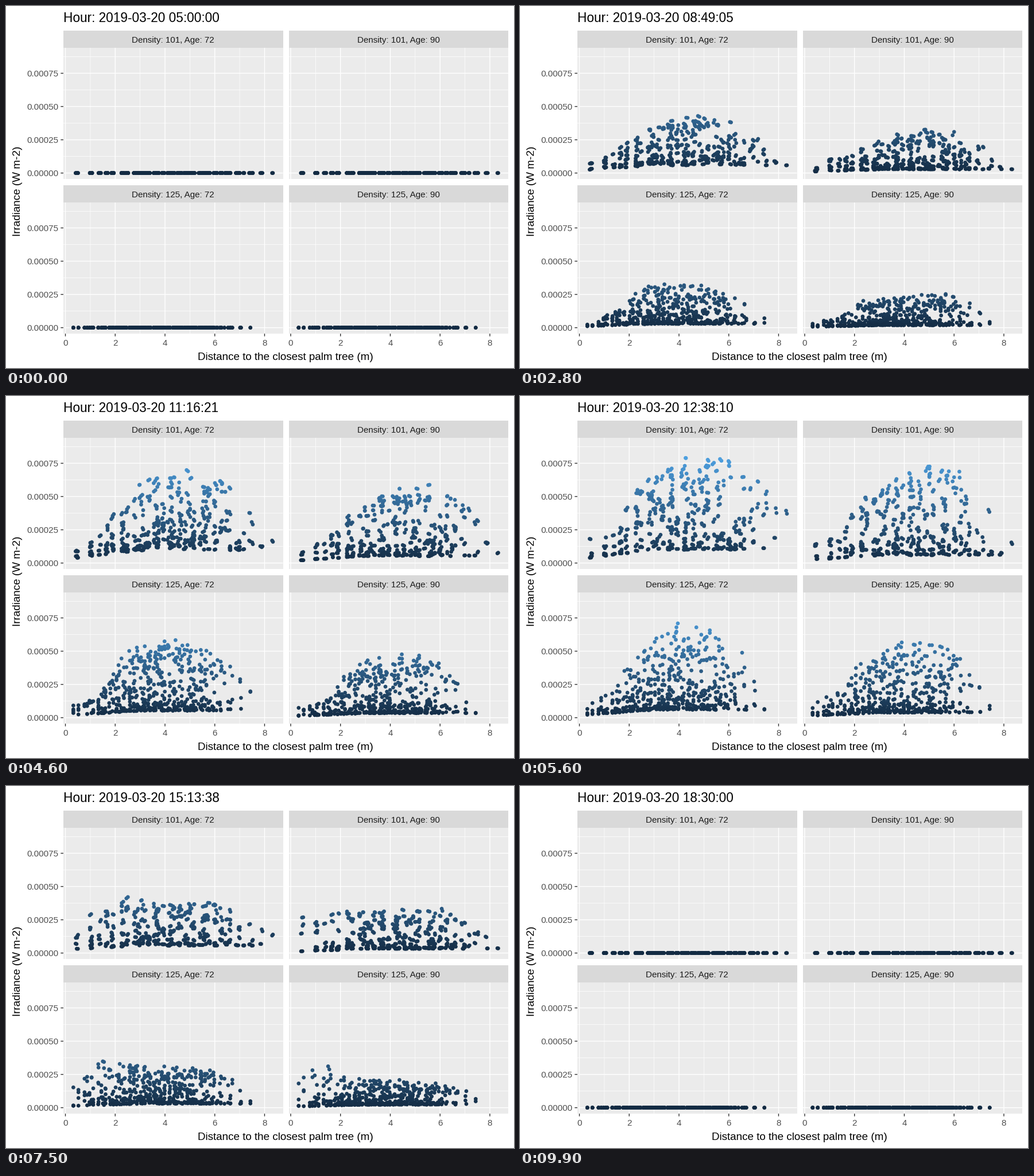
Write a matplotlib script that moves like this. It is 885x632 px and loops after 10 s.

```python
import numpy as np
import matplotlib.pyplot as plt
from matplotlib.animation import FuncAnimation
from matplotlib.colors import LinearSegmentedColormap
from matplotlib.patches import Rectangle

W, H, DPI = 885, 632, 100
FRAMES, INTERVAL = 100, 100
START, SPAN = 5 * 3600, 48600          # seconds of the day
PW, PH, STRIP = 382.5, 229, 30         # panel size and strip height
X_UNIT, Y_UNIT = 43.37, 2.322          # px per metre, px per 1e-5 W m-2

plt.rcParams["font.family"] = "Liberation Sans"
rng = np.random.default_rng(20)

# Upper limit of irradiance (1e-5) by distance, one row per time of day
DIST = [0.4, 1.4, 2.4, 4, 6, 8]
HOURS = [5, 5.5, 6.5, 7.72, 9.91, 12.63, 14.27, 16.45, 17.25, 18, 18.5]
PANELS = [
    dict(title="Density: 101, Age: 72", left=100, top=73, floor=10, skew=2.0,
         limit=[[8, 12, 21, 24, 22, 20], [7, 20, 45, 76, 65, 20],
                [18, 26, 65, 88, 87, 62], [43, 68, 72, 62, 56, 32],
                [4, 12, 13, 22, 23, 12]]),
    dict(title="Density: 101, Age: 90", left=492.5, top=73, floor=6, skew=2.5,
         limit=[[7, 13, 11, 13, 17, 6], [10, 16, 35, 57, 57, 20],
                [16, 26, 56, 83, 81, 48], [67, 69, 62, 53, 52, 18],
                [3, 7, 18, 17, 20, 13]]),
    dict(title="Density: 125, Age: 72", left=100, top=343, floor=6, skew=2.5,
         limit=[[4, 8, 13, 19, 18, 8], [6, 18, 52, 60, 40, 11],
                [15, 22, 62, 84, 70, 28], [34, 67, 53, 50, 46, 18],
                [3, 6, 20, 17, 20, 3]]),
    dict(title="Density: 125, Age: 90", left=492.5, top=343, floor=4, skew=3.0,
         limit=[[4, 5, 8, 13, 14, 4], [8, 11, 40, 42, 48, 5],
                [11, 22, 52, 68, 66, 8], [55, 56, 36, 39, 33, 12],
                [3, 17, 9, 10, 9, 4]]),
]


def cell_distances(size, shifts):
    """Distance to the trunk for a 16 x 16 cell grid around each tree."""
    gx, gy = np.meshgrid(np.arange(-6.5, 9), np.arange(-5.5, 10))
    return np.concatenate([np.hypot(gx * size + a, gy * size + b).ravel()
                           for a, b in shifts])


SPARSE = cell_distances(0.65, [(0.04, 0.03), (-0.02, 0.04)])
DENSE = cell_distances(0.575, [(0.15, 0), (0.15, 0)])
STEPS = np.arange(5, 18.6, 0.5)


def irradiance(panel, dist, paired):
    """Values at every half hour: a slow random wave between floor and limit."""
    half = dist.size // 2
    phase = rng.random(dist.size)
    speed = rng.uniform(0.05, 0.2, dist.size)
    if paired:
        phase[half:] = phase[:half] + rng.normal(0, 0.012, half)
        speed[half:] = speed[:half]
    rows = np.array(panel["limit"], float)
    zero = np.zeros(len(DIST))
    rows = np.vstack([zero, 0.02 * rows[0], 0.25 * rows[0], rows,
                      0.35 * rows[-1], 0.02 * rows[-1], zero])
    near = 0.3 + 0.7 * np.minimum(dist / 3, 1)
    values = []
    for k, hour in enumerate(STEPS):
        row = [np.interp(hour, HOURS, col) for col in rows.T]
        high = np.interp(dist, DIST, row)
        low = panel["floor"] * near * max(row) / rows.max()
        u = np.abs((phase + speed * k) % 1 * 2 - 1)
        values.append(low + np.maximum(high - low, 0) * u ** panel["skew"])
    return np.array(values)


fig = plt.figure(figsize=(W / DPI, H / DPI), dpi=DPI, facecolor="white")
ax = fig.add_axes([0, 0, 1, 1])
ax.set(xlim=(0, W), ylim=(H, 0))
ax.axis("off")


def label(x, y, text, px, color="black", ha="center", rotation=0):
    return ax.text(x, y, text, fontsize=px * 72 / DPI, color=color, ha=ha,
                   va="baseline", rotation=rotation, rotation_mode="anchor")


def line(x, y, px, color="white", z=2):
    ax.plot(x, y, color=color, lw=px * 72 / DPI, zorder=z, snap=False,
            solid_capstyle="butt")


def box(x, y, w, h, color):
    ax.add_patch(Rectangle((x, y), w, h, fc=color, ec="none", zorder=1))


def draw_panel(panel):
    left, top = panel["left"], panel["top"]
    right, bottom = left + PW, top + PH
    x0, y0 = left + 3.5, top + 218.6
    box(left, top - STRIP, PW, STRIP, "#D9D9D9")
    box(left, top, PW, PH, "#EBEBEB")
    label(left + PW / 2, top - 8.7, panel["title"], 15.1, "#1A1A1A")
    for major in (False, True):
        width = 1.4 if major else 0.7
        for m in range(0 if major else 1, 9, 2):
            line([x0 + m * X_UNIT] * 2, [top, bottom], width)
        for v in np.arange(0 if major else 12.5, 90, 25):
            line([left, right], [y0 - v * Y_UNIT] * 2, width)
    if left == 100:
        for v in range(0, 76, 25):
            y = y0 - v * Y_UNIT
            line([left - 4.7, left], [y, y], 1.4, "#333333")
            label(91.5, y + 5.6, f"{v / 1e5:.5f}", 15.1, "#4D4D4D", "right")
    if top == 343:
        for m in range(0, 9, 2):
            x = x0 + m * X_UNIT
            line([x, x], [bottom, bottom + 4.7], 1.4, "#333333")
            label(x, 592.7, str(m), 15.1, "#4D4D4D")
    return x0, y0


xs, bases, levels = [], [], []
for panel in PANELS:
    x0, y0 = draw_panel(panel)
    sparse = "101" in panel["title"]
    dist = SPARSE if sparse else DENSE
    xs.append(x0 + dist * X_UNIT)
    bases.append(np.full(dist.size, y0))
    levels.append(irradiance(panel, dist, sparse))
xs, bases, levels = np.hstack(xs), np.hstack(bases), np.hstack(levels)

title = label(100, 27.6, "", 22.65, ha="left")
label(487.3, 618.3, "Distance to the closest palm tree (m)", 18.9)
label(25.3, 323, "Irradiance (W m-2)", 18.9, rotation=90)

blues = LinearSegmentedColormap.from_list(
    "blues", ["#132B43", "#336A98", "#56B1F7"])
dots = ax.scatter(xs, bases, s=(6.7 * 72 / DPI) ** 2, c=np.zeros(xs.size),
                  cmap=blues, vmin=0, vmax=90, linewidths=0, zorder=3)


def update(n):
    seconds = START + SPAN * n // (FRAMES - 1)
    h, rest = divmod(seconds, 3600)
    title.set_text(f"Hour: 2019-03-20 {h:02d}:{rest // 60:02d}:{rest % 60:02d}")
    pos = n / (FRAMES - 1) * (len(STEPS) - 1)
    k = min(int(pos), len(STEPS) - 2)
    value = levels[k] + (levels[k + 1] - levels[k]) * (pos - k)
    dots.set_offsets(np.column_stack([xs, bases - value * Y_UNIT]))
    dots.set_array(value)
    return dots, title


anim = FuncAnimation(fig, update, frames=FRAMES, interval=INTERVAL,
                     repeat=True, repeat_delay=0, blit=False)
plt.show()
```
